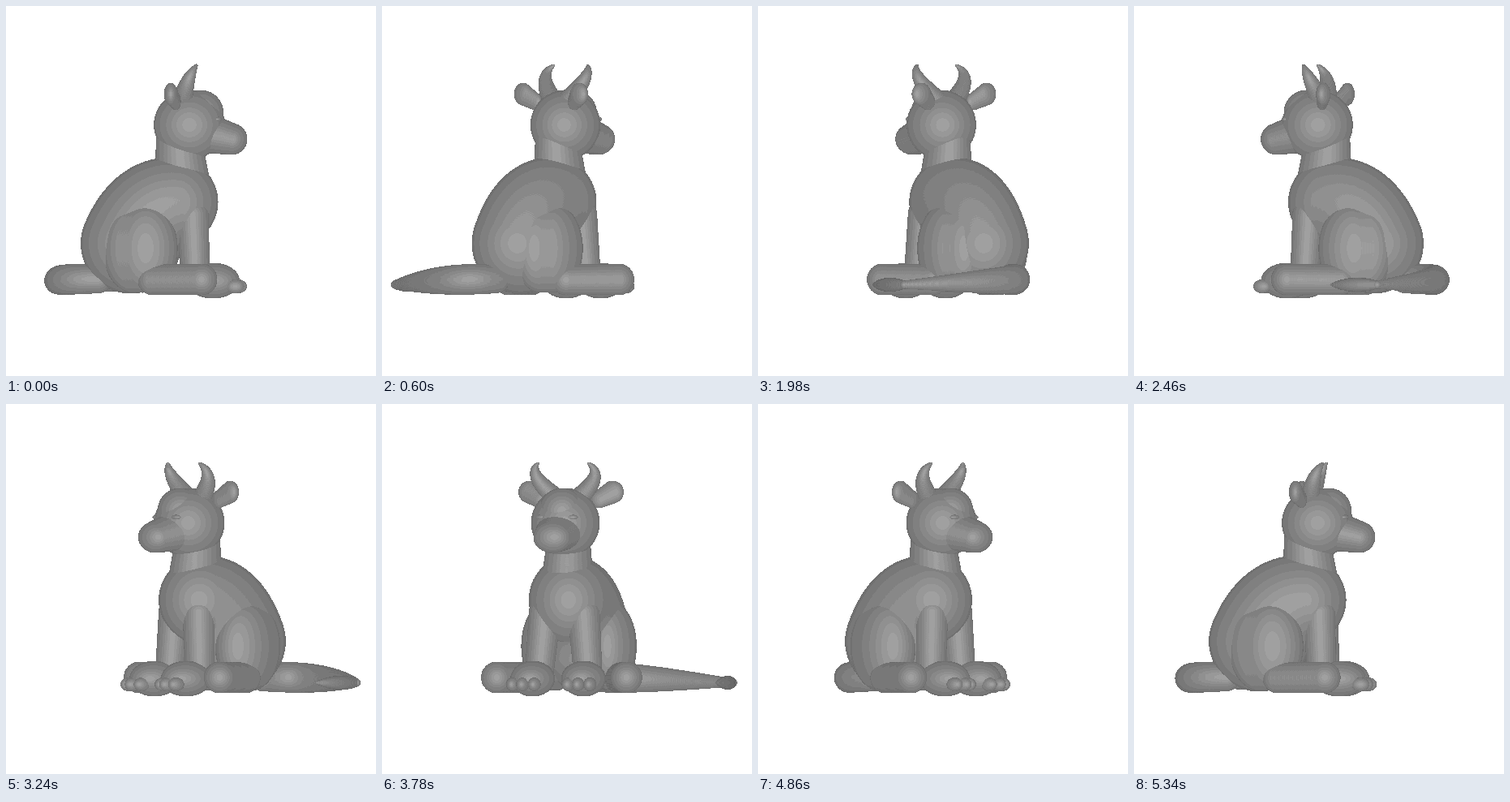
These frames come from a looping animation (456 px wide and 456 px high, 5.4 s). An HTML page with a canvas:

```html
<!DOCTYPE html>
<html lang="en">
<head>
<meta charset="utf-8">
<title>Turntable</title>
<style>
html, body { margin: 0; width: 100%; height: 100%; overflow: hidden; background: #fff; }
canvas { display: block; width: 456px; height: 456px; }
</style>
</head>
<body>
<canvas id="stage" width="456" height="456"></canvas>
<script>
const SIZE = 456, AXIS = 225.5, LOOP = 5400, STEP = 60, POSES = LOOP / STEP;
const ctx = document.getElementById('stage').getContext('2d');
const image = ctx.createImageData(SIZE, SIZE);
const pixels = new Uint32Array(image.data.buffer);
const depth = new Float32Array(SIZE * SIZE);
const blobs = [];

const mix = (p, q, t) => p.map((v, i) => v + (q[i] - v) * t);

// A ball at [forward, down, side, radius], stretched along each axis.
function ball([x, y, z, r], { scale = [1, 1, 1], pair = false, tint = 0 } = {}) {
  const [a, b, c] = scale.map(s => s * r);
  for (const side of pair ? [1, -1] : [1]) blobs.push({ x, y, z: z * side, a, b, c, tint });
}

// Balls of varying size along a curve; bend is its control point.
function sweep(from, to, { bend = mix(from, to, 0.5), ...look } = {}) {
  const length = Math.hypot(bend[0] - from[0], bend[1] - from[1], bend[2] - from[2])
    + Math.hypot(to[0] - bend[0], to[1] - bend[1], to[2] - bend[2]);
  const steps = Math.ceil(length / 2);
  for (let i = 0; i <= steps; i++) {
    const t = i / steps;
    ball(mix(mix(from, bend, t), mix(bend, to, t), t), look);
  }
}

function buildHead() {
  ball([0, 146, 0, 43], { scale: [1.02, 1, 0.98] });
  ball([14, 131, 0, 28]);
  sweep([0, 151, 0, 28], [52, 163.5, 0, 19.5], { scale: [1, 1, 1.22] });
  ball([34, 139, 19, 6], { scale: [1, 0.6, 1.4], pair: true });
  sweep([-8, 114, 16, 12], [8.5, 73, 33, 2], { bend: [-2, 86, 50, 9], pair: true });
  sweep([-17, 117, 38, 11], [-23, 108, 54, 14], { scale: [0.6, 1, 1], pair: true });
}

function buildTrunk() {
  sweep([-13, 165, 0, 28], [-9, 215, 0, 34], { scale: [1, 1, 0.93] });
  sweep([-19, 241, 0, 54.5], [-72, 292, 0, 62], { bend: [-52, 244, 0, 62], scale: [1, 1, 0.93] });
}

function buildLimbs() {
  sweep([-68, 298, 35, 55], [-54, 298, 42, 55], { scale: [0.72, 1, 0.55], pair: true });
  sweep([-45, 337, 55, 19], [15, 336.5, 84, 19.5], { pair: true });
  sweep([4, 256, 25, 20], [7, 325, 31, 18], { pair: true });
  ball([29, 338, 33, 22], { scale: [1.5, 1, 1.22], pair: true });
  for (const side of [-14, 0, 14]) {
    ball([60 - Math.abs(side) / 4, 345, 36 + side, 8.5], { scale: [1.3, 1, 0.9], pair: true });
  }
}

function buildTail() {
  const end = [-127, 343, -176, 5];
  sweep([-112, 336, 0, 17.5], end, { bend: [-204, 336, 0, 23] });
  sweep(end, [-66, 343, -173, 1], { bend: [-96, 343, -180, 14], scale: [1, 1, 0.7], tint: -12 });
}

function shade(facing, tint) {
  const light = 98 + 36 * facing ** 0.6 + 26 * facing ** 8 + tint;
  return 0xff000000 | Math.round(light / 8) * 8 * 0x10101;
}

function drawBlob(blob, cos, sin) {
  const { a, b, c, tint } = blob;
  const cx = AXIS + blob.x * cos + blob.z * sin;
  const cd = blob.z * cos - blob.x * sin;
  const ia = 1 / (a * a), ib = 1 / (b * b), ic = 1 / (c * c);
  const A = sin * sin * ia + cos * cos * ic;
  const B = cos * sin * (ic - ia);
  const C = cos * cos * ia + sin * sin * ic;
  const reach = Math.sqrt(A / (A * C - B * B));

  for (let py = Math.ceil(blob.y - b); py <= blob.y + b; py++) {
    const y = py - blob.y;
    const rest = 1 - y * y * ib;
    for (let px = Math.ceil(cx - reach); px <= cx + reach; px++) {
      const x = px - cx;
      const root = B * B * x * x - A * (C * x * x - rest);
      if (root < 0) continue;
      const d = (Math.sqrt(root) - B * x) / A;
      const at = py * SIZE + px;
      if (cd + d <= depth[at]) continue;
      depth[at] = cd + d;
      const nd = Math.sqrt(root);
      pixels[at] = shade(nd / Math.hypot(C * x + B * d, y * ib, nd), tint);
    }
  }
}

function drawPose(pose) {
  const angle = pose / POSES * 2 * Math.PI;
  const cos = Math.cos(angle), sin = Math.sin(angle);
  pixels.fill(0xffffffff);
  depth.fill(-1e4);
  for (const blob of blobs) drawBlob(blob, cos, sin);
  ctx.putImageData(image, 0, 0);
}

buildHead();
buildTrunk();
buildLimbs();
buildTail();

const start = performance.now();
let shown = -1;
function tick() {
  const pose = Math.floor((performance.now() - start) % LOOP / STEP);
  if (pose !== shown) drawPose(shown = pose);
  requestAnimationFrame(tick);
}
tick();
</script>
</body>
</html>
```
